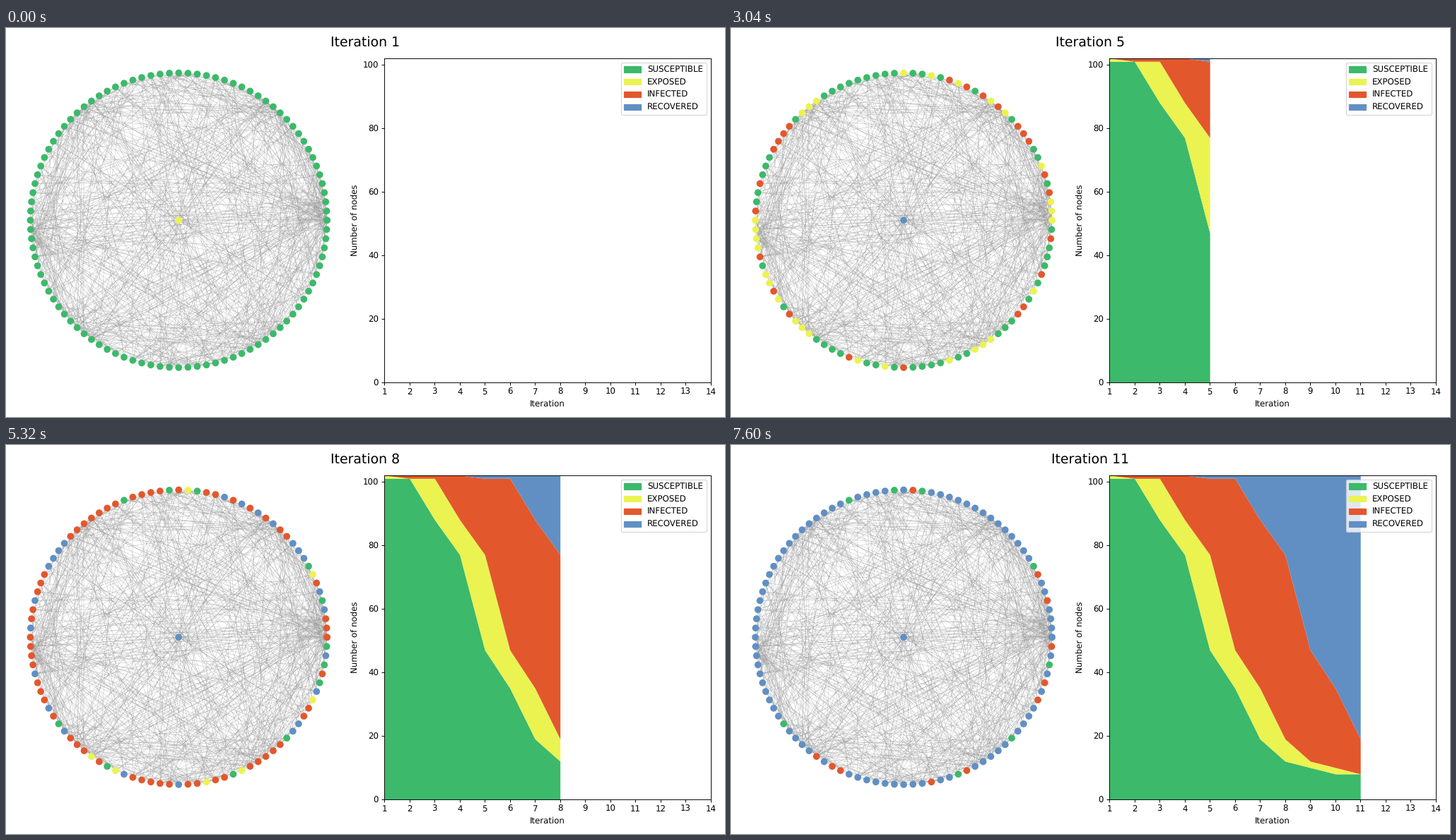
Write a matplotlib script that moves like this. It is 1017 px wide and 551 px high and loops after 8 s.

```python
import numpy as np
import matplotlib.pyplot as plt
from matplotlib.animation import FuncAnimation
from matplotlib.collections import LineCollection
from matplotlib.patches import Patch

plt.rcParams["text.hinting"] = "none"

W, H, DPI = 1017, 551, 84.75
TICK, STEP, LOOP = 40, 760, 8000
COLORS = ["#3cb96a", "#ebf350", "#e3572d", "#618fc3"]
LABELS = ["SUSCEPTIBLE", "EXPOSED", "INFECTED", "RECOVERED"]

# A ring of 100 places, a twin hidden below node 0, and the centre.
RING, TWIN, CENTRE, TOTAL = 100, 100, 101, 102
ILL_FOR = 3
NEVER = 99

FIRST_WAVE = [5, 10, 14, 18, 20, 39, 40, 58, 61, 75, 90, 94, 98]
SPARED = [8, 23, 26, 31, 60, 81, 88, 97]
HUBS = [1, 14, 36, 51, 63, 84]
WAVE_SIZES = [11, 30, 12, 16, 7, 2, 2]  # newly exposed from iteration 4 on


def hub_distance():
    gap = np.abs(np.arange(TOTAL)[:, None] - HUBS) % RING
    return np.minimum(gap, RING - gap).min(axis=1)


def spread():
    """Iteration at which each node is exposed; hub areas lead the second wave."""
    rng = np.random.default_rng(4)
    exposed = np.full(TOTAL, NEVER)
    exposed[CENTRE] = 1
    exposed[FIRST_WAVE] = 3
    rest = np.setdiff1d(np.arange(CENTRE), FIRST_WAVE + SPARED)
    rest = rng.permutation(rest)
    near = hub_distance()[rest] <= 1
    others = rest[~near]
    lead = WAVE_SIZES[0]
    queue = np.r_[others[:lead], rest[near], others[lead:]]
    exposed[queue] = np.repeat(np.arange(len(WAVE_SIZES)) + 4, WAVE_SIZES)
    return exposed


def make_edges(count=660, spokes=46):
    rng = np.random.default_rng(12)
    weight = 1 + 2.5 * np.exp(-hub_distance() ** 2 / 2)
    weight[CENTRE] = 0
    weight /= weight.sum()
    edges = {(0, CENTRE)}
    edges.update((int(n), CENTRE) for n in rng.choice(RING, spokes, replace=False))
    while len(edges) < count:
        a, b = sorted(rng.choice(TOTAL, 2, replace=False, p=weight))
        edges.add((int(a), int(b)))
    return sorted(edges)


exposed = spread()


def states(t):
    age = t - exposed
    return np.select([age < 0, age == 0, age <= ILL_FOR], [0, 1, 2], 3)


angle = 2 * np.pi * np.arange(TOTAL) / RING
pos = np.column_stack([np.cos(angle), -np.sin(angle)])
pos[CENTRE] = 0
pos = pos * [209.8, 208.7] + [244.2, 272.3]
order = np.r_[TWIN, 0:RING, CENTRE]

iterations = np.arange(1, 12)
counts = np.array([np.bincount(states(t), minlength=4) for t in iterations])
levels = np.column_stack([np.zeros(len(iterations)), counts.cumsum(axis=1)])

fig = plt.figure(figsize=(W / DPI, 6.5015), dpi=DPI)
title = fig.suptitle("Iteration 1", fontsize=16)

net = fig.add_axes([0, 0, 1, 1])
net.set(xlim=(0, W), ylim=(H, 0))
net.axis("off")
net.add_collection(LineCollection([pos[list(e)] for e in make_edges()],
                                  colors="#999999", linewidths=0.25, zorder=1))
dots = net.scatter(*pos[order].T, s=68, linewidths=0, zorder=2)

left, right, top, bottom = 535.2, 996.7, 42.8, 501.9
chart = fig.add_axes([left / W, 1 - bottom / H, (right - left) / W, (bottom - top) / H])
chart.set(xlim=(1, 14), ylim=(0, TOTAL), xticks=range(1, 15),
          xlabel="Iteration", ylabel="Number of nodes")
chart.legend(handles=[Patch(color=c, label=s) for c, s in zip(COLORS, LABELS)],
             loc="upper right", labelspacing=0.53)
areas = []


def draw(frame):
    n = min(frame * TICK // STEP, len(iterations) - 1) + 1
    title.set_text(f"Iteration {n}")
    dots.set_facecolors([COLORS[s] for s in states(n)[order]])
    while areas:
        areas.pop().remove()
    if n > 1:
        for k, color in enumerate(COLORS):
            areas.append(chart.fill_between(iterations[:n], levels[:n, k],
                                            levels[:n, k + 1], color=color, linewidth=0))
    return [title, dots, *areas]


anim = FuncAnimation(fig, draw, frames=LOOP // TICK, interval=TICK,
                     init_func=lambda: draw(0), repeat=True, repeat_delay=0)
plt.show()
```
